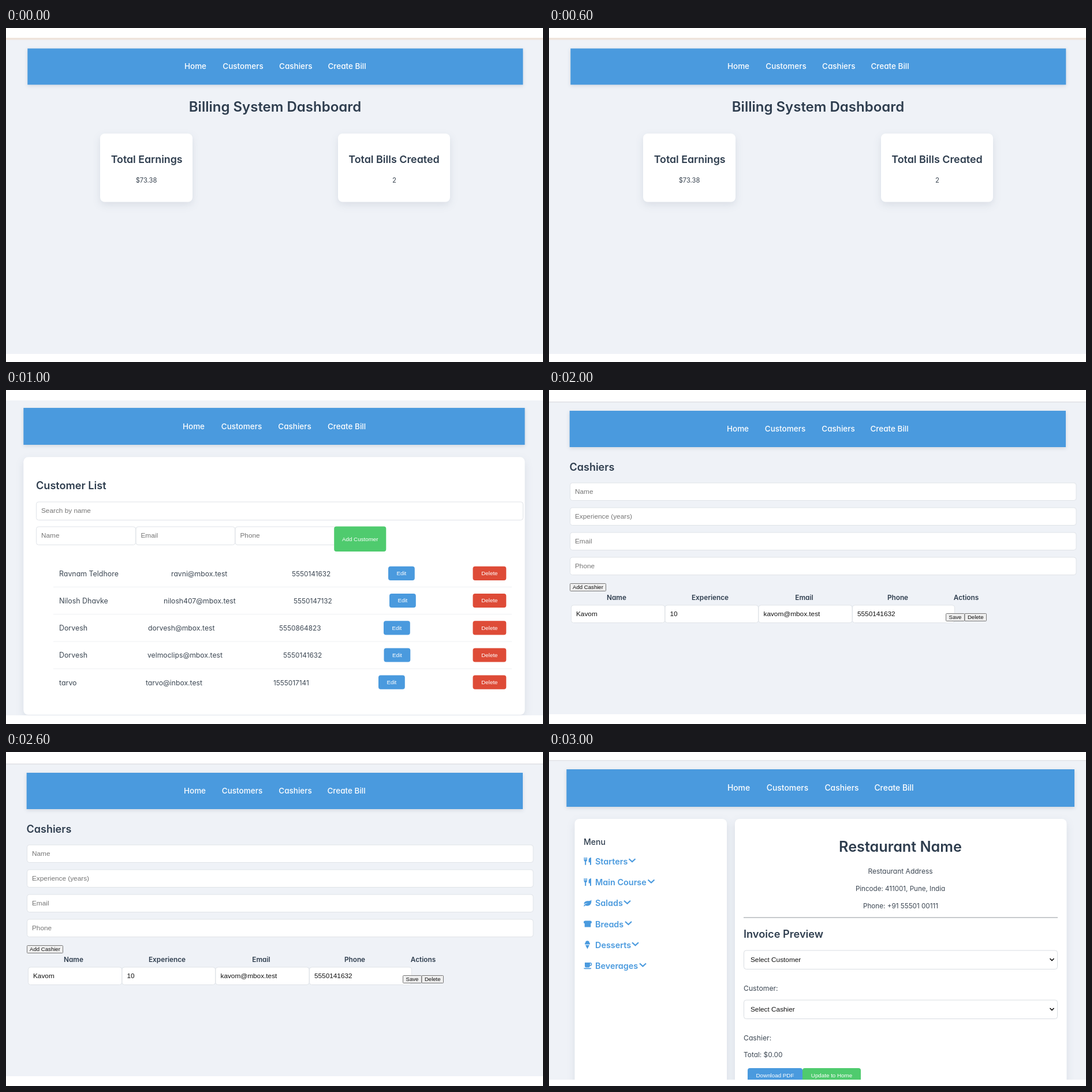
An HTML page for the animation above (4 s loop, 930 by 579 pixels).

```html
<!DOCTYPE html>
<html lang="en">
<head>
<meta charset="utf-8">
<title>Billing dashboard</title>
<style>
  html, body { margin: 0; width: 100%; height: 100%; overflow: hidden; background: #fff; }
  svg { display: block; width: 930px; height: 579px; }
  text { font-family: Inter, Roboto, sans-serif; font-feature-settings: "cv11"; font-optical-sizing: none; white-space: pre; }
  .ui { font-family: "Liberation Sans", Arial, sans-serif; }
  .bar { filter: drop-shadow(0 2px 3px rgba(30, 50, 80, .14)); }
  .card { filter: drop-shadow(0 5px 7px rgba(30, 50, 80, .1)); }
</style>
</head>
<body>
<svg id="stage" viewBox="0 0 930 579" xmlns="http://www.w3.org/2000/svg"></svg>
<script>
const BLUE = '#4a9ade', GREEN = '#4fcb6e', RED = '#de4b37';
const DARK = '#2e3d4e', BODY = '#3c4753', HINT = '#757575';

const rect = (x, y, r, b, fill, more = '') =>
  `<rect x="${x}" y="${y}" width="${r - x}" height="${b - y}" fill="${fill}" ${more}/>`;
const text = (s, x, y, size, fill = BODY, weight = 400, more = '') =>
  `<text x="${x}" y="${y}" font-size="${size}" fill="${fill}" font-weight="${weight}" ${more}>${s}</text>`;
const mid = (s, x, y, size, fill, weight) => text(s, x, y, size, fill, weight, 'text-anchor="middle"');
const ui = (s, x, y, size = 11.8, fill = HINT) => text(s, x, y, size, fill, 400, 'class="ui"');
const uiMid = (s, x, y, size, fill) => text(s, x, y, size, fill, 400, 'class="ui" text-anchor="middle"');
const line = (d, color, w) => `<path d="${d}" fill="none" stroke="${color}" stroke-width="${w}"/>`;

const page = (top, bottom, edge, body) =>
  rect(0, 0, 930, 579, '#fff') + rect(0, top, 930, 579, '#eff2f7') + edge + body +
  rect(0, bottom, 930, 579, '#fff');
const card = (x, y, r, b) => rect(x, y, r, b, '#fff', 'rx="8" class="card"');
const box = (x, y, r, b, color = '#dfe3e8') =>
  rect(x + .5, y + .5, r - .5, b - .5, '#fff', `rx="4" stroke="${color}"`);
const field = (s, x, y, r, h, fill) => box(x, y, r, y + h) + ui(s, x + 9, y + h / 2 + 3.5, 11.8, fill);
const button = (s, x, y, r, b, fill) =>
  rect(x, y, r, b, fill, 'rx="4"') + uiMid(s, (x + r) / 2, (y + b) / 2 + 3.3, 9.8, '#fff');
const plain = (s, x, y, r, b) =>
  rect(x + .5, y + .5, r - .5, b - .5, '#efefef', 'stroke="#777" rx="1"') +
  uiMid(s, (x + r) / 2, b - 3.6, 9.6, '#111');

function nav(x, y, r, b, centers, size = 13.5) {
  const names = ['Home', 'Customers', 'Cashiers', 'Create Bill'];
  return rect(x, y, r, b, BLUE, 'class="bar"') +
    names.map((s, i) => mid(s, centers[i], (y + b) / 2 + 4.5, size, '#fff', 500)).join('');
}

function dashboard() {
  return page(17, 565, rect(0, 17, 930, 20.5, '#efe4dc'),
    nav(37.3, 35.5, 895.3, 98.3, [328, 410.5, 501.8, 590.5]) +
    mid('Billing System Dashboard', 466, 145, 24, DARK, 600) +
    card(163, 183, 323, 301.5) + card(575, 183, 769, 301.5) +
    mid('Total Earnings', 243.7, 234, 17.8, DARK, 600) +
    mid('$73.38', 243, 268, 11.2) +
    mid('Total Bills Created', 672, 234, 17.9, DARK, 600) +
    mid('2', 672.5, 268, 11.5));
}

function customers() {
  const rows = [
    ['Ravnam Teldhore', 'ravni@mbox.test', 286, '5550141632', 495, 662],
    ['Nilosh Dhavke', 'nilosh407@mbox.test', 273, '5550147132', 498, 664],
    ['Dorvesh', 'dorvesh@mbox.test', 246, '5550864823', 473, 654],
    ['Dorvesh', 'velmoclips@mbox.test', 245, '5550141632', 480, 654.5],
    ['tarvo', 'tarvo@inbox.test', 242, '1555017141', 463, 645]
  ];
  const list = rows.map(([name, mail, mx, phone, px, bx], i) => {
    const y = 318 + i * 47.2;
    return text(name, 92, y + 4.7, 12.4) + text(mail, mx, y + 4.7, 12.2) + text(phone, px, y + 4.7, 11.8) +
      button('Edit', bx, y - 12.2, bx + 45.8, y + 12, BLUE) +
      button('Delete', 808.5, y - 12.2, 866.3, y + 12, RED) +
      (i < 4 ? line(`M82 ${y + 23.6}H876`, '#eef0f3', 1) : '');
  }).join('');
  return page(18, 564, '',
    nav(30.3, 31, 898.5, 95, [325, 408, 500, 590]) +
    card(30.3, 116.3, 898.5, 563) +
    text('Customer List', 52, 172, 18.1, DARK, 600) +
    field('Search by name', 52, 193.5, 896, 32.5) +
    field('Name', 52, 236.5, 225, 32.5) + field('Email', 224.5, 236.5, 397, 32.5) +
    field('Phone', 396.5, 236.5, 572, 32.5) +
    button('Add Customer', 568.2, 236.5, 658.3, 280, GREEN) + list);
}

function cashiers() {
  const hints = ['Name', 'Experience (years)', 'Email', 'Phone'];
  const heads = ['Name', 'Experience', 'Email', 'Phone', 'Actions'];
  const at = [117, 279, 442, 604, 722.5];
  const cells = ['Kavom', '10', 'kavom@mbox.test', '5550141632'];
  const left = [38, 200.5, 362.5, 525, 703];
  return page(20, 562, rect(0, 20, 930, 21.5, '#dfe1e5'),
    nav(35.7, 36, 895, 99, [327, 409, 501, 589.5]) +
    text('Cashiers', 35.5, 139.5, 18, DARK, 600) +
    hints.map((s, i) => field(s, 36, 160.5 + i * 43, 913.5, 31.5)).join('') +
    plain('Add Cashier', 36, 335, 99, 349) +
    heads.map((s, i) => mid(s, at[i], 364, 11.8, DARK, 600)).join('') +
    cells.map((s, i) => field(s, left[i], 372.5, left[i + 1] + (i < 3 ? .5 : 0), 31.5, '#111')).join('') +
    plain('Save', 687, 387, 720, 401) + plain('Delete', 719.5, 387, 758, 401));
}

// Menu icons, each about 13 px wide and centred on y = 0
const fork = '<path d="M60.5-6.5h1.2v4h.9v-4h1.2v4h.9v-4H66V-2q0 2-1.8 2.5V6.5h-2V.5Q60.5 0 60.5-2ZM73-6.5V6.5h-2V2h-2.3V-2.5Q69-6 73-6.5Z"/>';
const leaf = '<path d="M73.5-5.5Q74 5 66.5 5 64 5 63 4L61 6 60 5.2Q62 1 68 0 62 .3 60.8 2.5C60-2 64-3.5 67.5-3.5 71-3.5 72.5-4 73.5-5.5Z"/>';
const bread = '<path d="M63-5.5H71Q74-5.3 74-2.8 74-1 72.3-.7V5.5H61.7V-.7Q60-1 60-2.8 60-5.3 63-5.5Z"/>';
const cone = '<path d="M62.2-.7Q61.3-3 63-3.6 63.3-7 66.5-7T70-3.6Q71.7-3 70.8-.7ZM63 .5H70L66.5 7.3Z"/>';
const mug = '<path d="M62-5.5H71.5Q74.3-5.5 74.3-2.6T71 .3Q70.8 3 68.5 3H64.5Q62 3 62 .5ZM71-4V-1.2Q72.8-1.2 72.8-2.6T71-4ZM60 4H73.5Q73 5.7 71.8 5.7H61.8Q60.4 5.7 60 4Z" fill-rule="evenodd"/>';

function bill() {
  const menu = [
    ['Starters', fork, 137.5], ['Main Course', fork, 170.5], ['Salads', leaf, 129],
    ['Breads', bread, 131], ['Desserts', cone, 143], ['Beverages', mug, 156]
  ].map(([s, icon, x], i) => {
    const y = 189.3 + i * 36.25;
    return `<g transform="translate(0 ${y})" fill="${BLUE}">${icon}</g>` +
      text(s, 80, y + 5.5, 14.4, BLUE, 600) +
      line(`M${x + 1} ${y - 4}l5.5 5 5.5-5`, BLUE, 2.2);
  }).join('');
  const select = (s, y) => box(337, y, 881, y + 33.5, '#d9dde2') + ui(s, 349, y + 20.3, 11.8, '#111') +
    line(`M867.5 ${y + 14.5}l3.5 3.5 3.5-3.5`, '#111', 1.7);
  return page(14, 568, rect(0, 14, 930, 15.5, '#e2e4e8'),
    nav(30.3, 30, 910, 95, [328.5, 413, 507, 597.5], 13.9) +
    card(44.5, 116, 308, 600) + card(322, 116, 896.5, 600) +
    text('Menu', 60, 160.5, 14, DARK, 500) + menu +
    mid('Restaurant Name', 608.5, 173, 25.2, DARK, 600) +
    mid('Restaurant Address', 608.5, 211, 12) +
    mid('Pincode: 411001, Pune, India', 608.5, 241, 11.6) +
    mid('Phone: +91 55501 00111', 609, 270.5, 11.7) +
    line('M337 287H881', '#b4b8bc', 1.5) +
    text('Invoice Preview', 337, 322, 18.2, DARK, 600) +
    select('Select Customer', 343.5) + text('Customer:', 337, 413.5, 12.2) +
    select('Select Cashier', 429.5) + text('Cashier:', 337, 499.5, 12.2) +
    text('Total: $0.00', 337, 528.5, 11.9) +
    button('Download PDF', 344, 548, 439, 574, BLUE) +
    button('Update to Home', 439, 548, 540, 574, GREEN));
}

const stage = document.getElementById('stage');
stage.innerHTML = [dashboard, customers, cashiers, bill].map(f => `<g display="none">${f()}</g>`).join('');
const views = [...stage.children];
const start = performance.now();
let shown = -1;

function tick(now) {
  const i = Math.floor(Math.max(0, now - start) % 4000 / 1000);
  if (i !== shown) {
    views.forEach((g, n) => g.setAttribute('display', n === i ? 'inline' : 'none'));
    shown = i;
  }
  requestAnimationFrame(tick);
}
tick(start);
</script>
</body>
</html>
```
